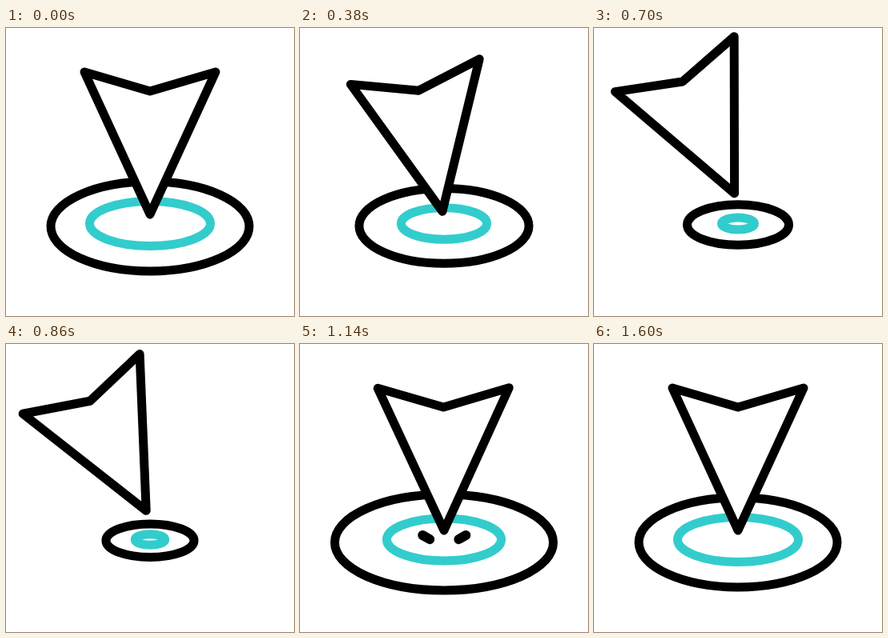
Animation of 360x360 px, one loop 3 s. Source, as an HTML page:

```html
<!DOCTYPE html>
<html lang="en">
<head>
<meta charset="utf-8">
<title>Location pointer</title>
<style>
  html, body { margin: 0; width: 100%; height: 100%; overflow: hidden; background: #fff; }
  svg { display: block; width: 100vw; height: 100vh; }
  .line { fill: none; stroke: #000; stroke-width: 11; stroke-linecap: round; stroke-linejoin: round; }
  #inner { stroke: #33cccc; }
  #arrow { fill: #fff; }
  #sparks { stroke-width: 12; }
</style>
</head>
<body>
<svg viewBox="0 0 360 360">
  <ellipse id="outer" class="line" cx="180" cy="248" rx="124" ry="56"/>
  <ellipse id="inner" class="line" cx="180" cy="244.5" rx="75.5" ry="28"/>
  <path id="arrow" class="line" d="M98 55L180 79L262 55L180 233Z"/>
  <path id="sparks" class="line" visibility="hidden"/>
</svg>
<script>
const LOOP = 3000, STEP = 20, REST = 1600;
const [outer, inner, arrow, sparks] =
  ['outer', 'inner', 'arrow', 'sparks'].map(id => document.getElementById(id));

const clamp = v => Math.min(1, Math.max(0, v));
const span = (t, a, b) => clamp((t - a) / (b - a));
const sine = v => (1 - Math.cos(Math.PI * v)) / 2;

// Wind up to 1, snap back through 0, then ring out as a damped spring.
function swing(t, { start, peak, cross, power, half, amp, decay }) {
  if (t < peak) return sine(span(t, start, peak));
  if (t < cross) return 1 - span(t, peak, cross) ** power;
  const n = (t - cross) / half;
  const fade = clamp((REST - t) / 180);
  return -amp * Math.sin(Math.PI * n) * decay ** n * fade;
}

const TILT = { start: 0, peak: 860, cross: 1005, power: 1.6, half: 133, amp: 0.29, decay: 0.62 };
const OUTER = { start: 127, peak: 870, cross: 1055, power: 1.22, half: 170, amp: 0.3, decay: 0.37 };
const INNER = { start: 50, peak: 850, cross: 992, power: 1.1, half: 120, amp: 0.3, decay: 0.4 };

function setAttrs(el, attrs) {
  for (const key in attrs) el.setAttribute(key, attrs[key]);
}

function drawSparks(t) {
  const on = t >= 1080 && t < 1400;
  sparks.setAttribute('visibility', on ? 'visible' : 'hidden');
  if (!on) return;
  const left = 1 - span(t, 1060, 1380);
  const ends = [1 - left ** 1.8, 1 - left ** 5];
  const side = dir => 'M' + ends
    .map(u => `${180.3 - dir * (8 + 25 * u)} ${250 - 14.5 * u}`)
    .join('L') + (left ? '' : 'h.01');
  sparks.setAttribute('d', side(1) + side(-1));
}

function draw(t) {
  const angle = -27.1 * swing(t, TILT);
  const lift = t < 800 ? sine(span(t, 250, 800)) : 1 - span(t, 800, 968) ** 2;
  arrow.setAttribute('transform', `translate(0 ${-29.6 * lift}) rotate(${angle} 180 243.5)`);

  const big = -69 * swing(t, OUTER);
  setAttrs(outer, {
    rx: 124 + big,
    ry: 56 + big * (big > 0 ? 0.31 : 0.51),
    cy: 248 + Math.min(0, big) * 0.033
  });

  const rx = 75.5 - 60 * swing(t, INNER);
  setAttrs(inner, { rx, ry: 0.374 * rx - 0.25 });

  drawSparks(t);
}

function frame() {
  const t = performance.now() % LOOP;
  draw(Math.min(REST, Math.floor(t / STEP) * STEP));
  requestAnimationFrame(frame);
}
frame();
</script>
</body>
</html>
```
